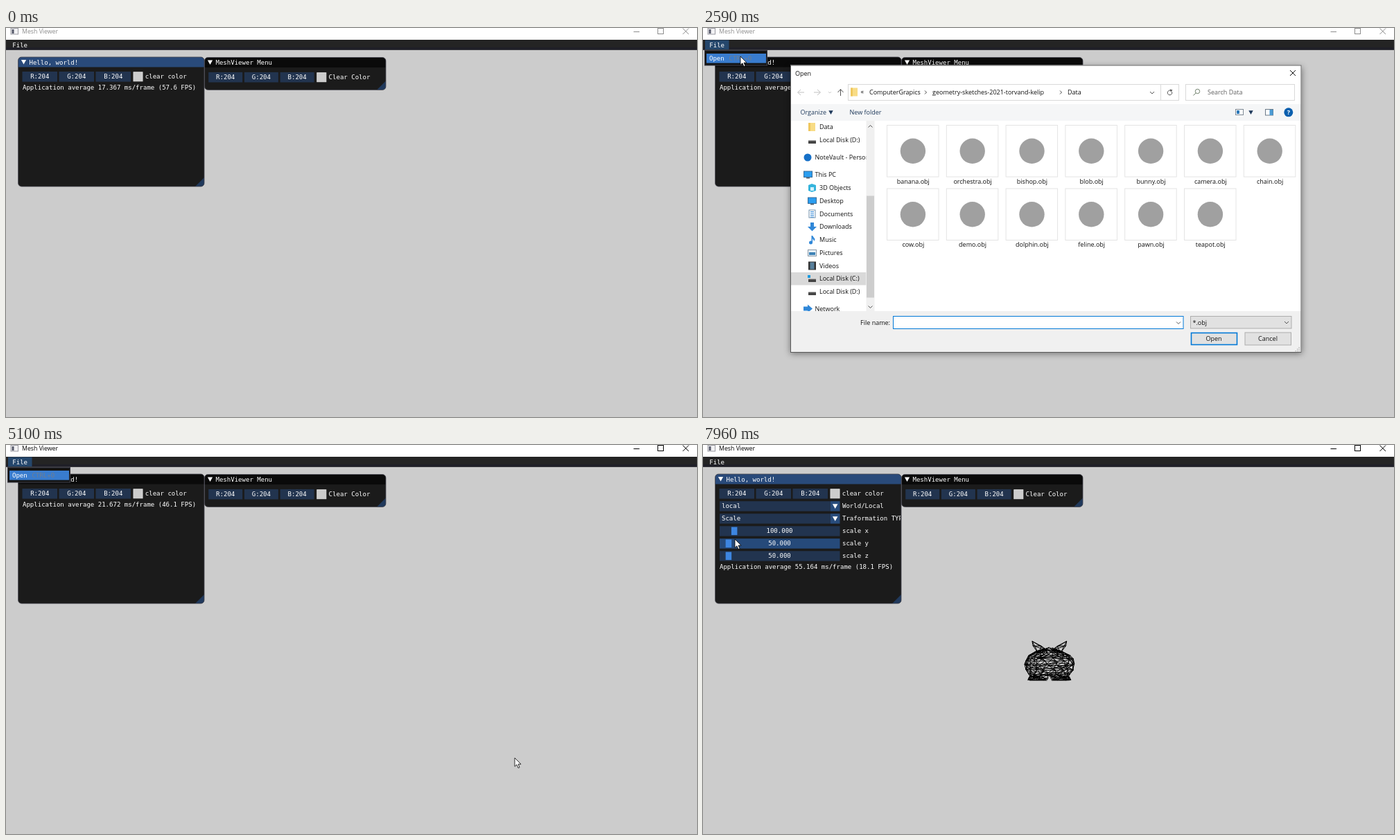
Animation, 997 px wide and 562 px high, one loop 8000 ms. Source, as an HTML page with a canvas:

```html
<!DOCTYPE html>
<html lang="en">
<head>
<meta charset="utf-8">
<title>Mesh Viewer</title>
<style>
html, body { margin: 0; width: 100%; height: 100%; overflow: hidden; background: #ccc; }
canvas { display: block; width: 997px; height: 562px; }
</style>
</head>
<body>
<canvas id="stage" width="997" height="562"></canvas>
<script>
const ctx = document.getElementById('stage').getContext('2d');
const LOOP = 8000;
const MONO = '9.04px "DejaVu Sans Mono", monospace';
const UI = '9px "Open Sans", sans-serif';
const FRAME = '#22344f', HOVER = '#264a7a', BLUE = '#3d85e0', ITEM = '#397cce';

// Moments of the session, in ms
const AT = { focus: 900, menu: 1330, blur: 2180, dialog: 2540, pick: 3880, closed: 4940,
  loaded: 5300, combo: 6250, chosen: 6830, drag: 7200, drop: 7650 };
// Cursor tip: time, x, y
const PATH = [[40, 903, 499], [840, 72, 1], [950, 72, 2], [1270, 20, 21], [1400, 20, 22],
  [1700, 26, 37], [1900, 26, 37], [2150, 54, 41], [3200, 54, 41], [3480, 439, 138],
  [3820, 646, 190], [4050, 648, 192], [4450, 655, 287], [4780, 734, 452], [5290, 734, 452],
  [6060, 122, 102], [6300, 120, 103], [6600, 63, 136], [6850, 63, 136], [7150, 36.7, 123],
  [7200, 36.7, 123], [7650, 45, 123], [7730, 45, 123], [7930, 46, 136]];
const PRESSES = [[1300, 1390], [2060, 2160], [3840, 3930], [4800, 4890], [6210, 6310], [6620, 6800], [7180, 7680]];
const FRAME_MS = [[0, 17.367], [1800, 21.537], [2180, 21.6], [5100, 21.672], [5290, 22.4], [6680, 53.065], [7960, 55.164]];

const FILES = ['banana', 'orchestra', 'bishop', 'blob', 'bunny', 'camera', 'chain',
  'cow', 'demo', 'dolphin', 'feline', 'pawn', 'teapot'];
const PLACES = [['Data', 143, 'folder'], ['Local Disk (D:)', 162, 'disk'], ['NoteVault - Person', 187, 'dot'],
  ['This PC', 212, 'screen'], ['3D Objects', 231, 'cube'], ['Desktop', 250, 'screen'], ['Documents', 268.5, 'sheet'],
  ['Downloads', 287, 'down'], ['Music', 306, 'note'], ['Pictures', 325, 'picture'], ['Videos', 343.5, 'film'],
  ['Local Disk (C:)', 362, 'system'], ['Local Disk (D:)', 381, 'disk'], ['Network', 405.5, 'right']];

const clamp = v => Math.min(1, Math.max(0, v));
const ramp = (t, a, b) => { const u = clamp((t - a) / (b - a)); return u * u * (3 - 2 * u); };

function box(x, y, w, h, fill, stroke, width = 1) {
  if (fill) { ctx.fillStyle = fill; ctx.fillRect(x, y, w, h); }
  if (stroke) { ctx.strokeStyle = stroke; ctx.lineWidth = width; ctx.strokeRect(x, y, w, h); }
}
function text(s, x, y, color = '#fff', font = MONO, align = 'left') {
  ctx.font = font; ctx.fillStyle = color; ctx.textAlign = align;
  ctx.fillText(s, x, y + 3.1);
}
const ui = (s, x, y, color = '#111', align) => text(s, x, y, color, UI, align);
function trace(points) {
  ctx.beginPath();
  points.forEach(([x, y]) => ctx.lineTo(x, y));
}
function line(color, ...points) {
  trace(points); ctx.strokeStyle = color; ctx.lineWidth = 1; ctx.stroke();
}
function poly(color, ...points) {
  trace(points); ctx.fillStyle = color; ctx.fill();
}
function disc(x, y, r, color) {
  ctx.beginPath(); ctx.arc(x, y, r, 0, 7); ctx.fillStyle = color; ctx.fill();
}
const triangle = (x, y, r, color = '#fff') => poly(color, [x - r, y - r * .8], [x + r, y - r * .8], [x, y + r]);
const chevron = (x, y, d = 1) => line('#555', [x - 3, y - 1.5 * d], [x, y + 1.5 * d], [x + 3, y - 1.5 * d]);

// ---- main window ----
function titleBar(active) {
  const c = active ? '#000' : '#8c8c8c';
  box(0, 0, 997, 17, '#fff');
  box(7, .5, 10.5, 8.5, '#f2f2f4', '#9a9aa2');
  box(8.5, 2, 3, 6, '#55596a');
  text('Mesh Viewer', 23, 5, c, '8.75px "Open Sans", sans-serif');
  line(c, [905.5, 5.5], [914, 5.5]);
  box(940.5, .5, 8, 8, null, c);
  line(c, [976.5, .5], [985, 9]);
  line(c, [985, .5], [976.5, 9]);
}
function panel(x, y, w, h, title, focused) {
  ctx.save();
  ctx.beginPath(); ctx.roundRect(x, y, w, h, 5); ctx.clip();
  box(x, y, w, h, '#1b1b1b');
  box(x, y, w, 14.5, focused ? '#294a7a' : '#0a0a0a');
  poly('#20395c', [x + w, y + h - 13], [x + w, y + h], [x + w - 13, y + h]);
  ctx.restore();
  ctx.beginPath(); ctx.roundRect(x, y, w, h, 5);
  ctx.strokeStyle = '#45454f'; ctx.lineWidth = .8; ctx.stroke();
  triangle(x + 8, y + 7, 3.6);
  text(title, x + 16, y + 7.6);
}
function colorRow(x, y, step, w, label) {
  ['R', 'G', 'B'].forEach((c, i) => {
    box(x + i * step, y - 7.3, w, 14.6, FRAME);
    text(c + ':204', x + i * step + w / 2, y, '#fff', MONO, 'center');
  });
  const sx = x + step * 3 + 1.5;
  box(sx, y - 6.5, 13, 13, '#ccc', '#dedede');
  text(label, sx + 16.8, y);
}
function combo(y, value, label, open) {
  box(24, y - 7, 160, 14.4, FRAME);
  box(184, y - 7, 13.5, 14.4, open ? '#4296fa' : '#284c7c');
  triangle(190.7, y, 3.8);
  text(value, 27, y);
  text(label, 201, y);
}
function slider(y, value, label, hot) {
  box(24, y - 7, 173.5, 14.4, hot ? HOVER : FRAME);
  box(24.4 + value * .165, y - 5.7, 8.5, 11.6, BLUE);
  text(value.toFixed(3), 110.5, y, '#fff', MONO, 'center');
  text(label, 201, y);
}
function meanFrame(t) {
  t -= t % 40;
  let i = 1;
  while (i < FRAME_MS.length - 1 && FRAME_MS[i][0] < t) i++;
  const [a, p] = FRAME_MS[i - 1], [b, q] = FRAME_MS[i];
  return p + (q - p) * clamp((t - a) / (b - a));
}
function helloPanel(t, [, cy], menuOpen) {
  panel(17.5, 42, 268.5, 187, 'Hello, world!', !menuOpen);
  ctx.save();
  ctx.beginPath(); ctx.rect(18, 57, 267, 170); ctx.clip();
  colorRow(23.5, 70.3, 53, 50.5, 'clear color');
  const loaded = t >= AT.loaded, scaling = t >= AT.chosen;
  if (loaded) {
    const open = t >= AT.combo && !scaling;
    combo(88.2, 'local', 'World/Local');
    combo(106.2, scaling ? 'Scale' : 'Translation', 'Traformation TYPE', open);
    ['x', 'y', 'z'].forEach((axis, i) => {
      const y = 124.2 + i * 18;
      const value = scaling ? (i ? 50 : scaleX(t)) : 0;
      slider(y, value, (scaling ? 'scale ' : 'translate ') + axis, t > 6950 && Math.abs(cy - y) < 7.3);
    });
    if (open) {
      box(24, 114.5, 173.5, 47.5, '#131416', '#3c3c46', .8);
      ['Translation', 'Scale', 'Rotation'].forEach((name, i) => {
        const y = 125 + i * 13.4, hot = cy > y - 7 && cy < y + 6.5;
        if (hot || !i) box(25, y - 6.8, 171.5, 13.4, hot ? ITEM : '#20384f');
        text(name, 26.5, y);
      });
    }
  }
  const ms = meanFrame(t);
  text(`Application average ${ms.toFixed(3)} ms/frame (${(1000 / ms).toFixed(1)} FPS)`, 24, loaded ? 176 : 86);
  ctx.restore();
}
function fileMenu(hot) {
  box(2.5, 32.5, 90, 21.5, '#141414', '#3e3e48');
  if (hot) box(5, 37, 86, 13.6, ITEM);
  text('Open', 9, 44);
  text('CTRL+O', 37.5, 44, 'rgba(128,128,128,.8)');
}

// ---- rabbit mesh: x in half widths, y in stage pixels ----
let seed = 7;
const rand = () => (seed = seed * 16807 % 2147483647) / 2147483647 - .5;
const edges = [];
const rings = [[295, .2], [299, .55], [304.5, .84], [310, .96], [317, 1], [324, .96], [330, .83], [334.5, .78], [339, .85]]
  .map(([y, w], j) => Array.from({ length: 16 }, (_, k) => {
    const a = (k + j % 2 / 2) * Math.PI / 8 + rand() * .25;
    return [w * Math.sin(a), Math.min(340, y + Math.cos(a) * 1.6 + rand() * 2)];
  }));
rings.forEach((ring, j) => ring.forEach((p, k) => {
  const n = (k + 1) % 16, below = rings[j + 1];
  edges.push([p, ring[n]]);
  if (below) edges.push([p, below[k]], [p, below[n]]);
}));
for (const s of [-1, 1]) {
  const ear = [[.69, 283.5], [.66, 290], [.44, 301], [.1, 296.5], [.32, 290.5]];
  const foot = [[.86, 339.5], [.8, 335], [.35, 333], [.14, 339.5], [.5, 336]];
  for (const part of [ear, foot]) part.forEach((p, i) => part.slice(i + 1).forEach(q =>
    edges.push([[p[0] * s, p[1]], [q[0] * s, q[1]]])));
}
const scaleX = t => 50 + 50 * ramp(t, AT.drag, AT.drop);
function rabbit(t) {
  const w = scaleX(t) * .36, X = p => 499.8 + p[0] * w;
  ctx.beginPath();
  for (const [p, q] of edges) { ctx.moveTo(X(p), p[1]); ctx.lineTo(X(q), q[1]); }
  ctx.strokeStyle = '#000'; ctx.lineWidth = 1; ctx.stroke();
  poly('#ccc', [499.8, 334], [499.8 + w * .1, 341], [499.8 - w * .1, 341]);
}

// ---- file dialog ----
function icon(kind, x, y) {
  const blue = '#2f87d8';
  switch (kind) {
    case 'folder': box(x + 1, y - 6, 10, 12, '#f8dc86'); box(x + 1, y - 6, 3, 12, '#efc75e'); break;
    case 'system': box(x, y - 5, 4, 4, '#1c9be0'); // falls through
    case 'disk': box(x + 1, y + 1, 11, 4, '#444'); box(x + 1, y, 11, 1.2, '#aaa'); break;
    case 'dot': disc(x + 6, y, 5.5, '#1670c8'); break;
    case 'screen': box(x + .5, y - 5, 12, 8.5, '#2a9df0', '#3a6c98'); box(x + 4, y + 4, 5, 1.5, '#567'); break;
    case 'cube': poly('#35b4dc', [x + 1, y - 4], [x + 6, y - 6], [x + 12, y - 4], [x + 12, y + 4], [x + 6, y + 6], [x + 1, y + 4]);
      box(x + 4, y - 1, 5, 5, '#d5f2fb'); break;
    case 'sheet': box(x + 2, y - 5.5, 9, 11, '#fff', '#7392ad');
      for (let i = -3; i < 5; i += 2.5) line(blue, [x + 4, y + i], [x + 9, y + i]); break;
    case 'down': box(x + 4, y - 6, 5, 6, blue); poly(blue, [x, y], [x + 13, y], [x + 6.5, y + 6.5]); break;
    case 'note': disc(x + 4.5, y + 4, 2.5, blue); box(x + 5.5, y - 6, 1.6, 10, blue);
      poly(blue, [x + 7, y - 6], [x + 10.5, y - 1], [x + 9.5, y + 2], [x + 7, y - 2]); break;
    case 'picture': box(x + .5, y - 4.5, 12, 9, '#e8f3fb', '#8a98a5'); box(x + 2, y - 1, 9, 4, '#3d82b5'); break;
    case 'film': box(x + 1, y - 6, 11, 12, '#333'); box(x + 3.5, y - 5, 6, 10, '#58809c'); break;
    case 'right': box(x, y - 3, 7, 6, blue); poly(blue, [x + 6, y - 6], [x + 13, y], [x + 6, y + 6]); break;
  }
}
function arrow(x, y, dx, dy, color) {
  line(color, [x - dx * 5, y - dy * 5], [x + dx * 4, y + dy * 4]);
  line(color, [x + dy * 4, y + dx * 4], [x + dx * 4.5, y + dy * 4.5], [x - dy * 4, y - dx * 4]);
}
function addressBar() {
  arrow(141, 93, -1, 0, '#c0c0c0');
  arrow(165, 93, 1, 0, '#c0c0c0');
  line('#ccc', [181, 92], [183, 94], [185, 92]);
  arrow(198.5, 93, 0, -1, '#555');
  box(209.5, 81.5, 477, 23, '#fff', '#d9d9d9');
  line('#d9d9d9', [660.5, 82], [660.5, 104]);
  icon('folder', 212, 92.5);
  ui('«', 227.5, 92);
  ui('ComputerGrapics', 240, 93);
  ui('geometry-sketches-2021-torvand-kelip', 331, 93);
  ui('Data', 526, 93);
  for (const x of [321, 516]) line('#444', [x - 1, 90.5], [x + 1.5, 93], [x - 1, 95.5]);
  chevron(648, 93.5);
  ctx.beginPath(); ctx.arc(673.5, 93.5, 3.3, -.4, 5);
  ctx.strokeStyle = '#555'; ctx.stroke();
  poly('#555', [673.5, 88.5], [677.5, 89.5], [675, 92.5]);
  box(696.5, 81.5, 157, 23, '#fff', '#d9d9d9');
  ctx.beginPath(); ctx.arc(713.5, 91.5, 3.2, 0, 7);
  ctx.strokeStyle = '#6e7f6a'; ctx.stroke();
  line('#6e7f6a', [711, 94], [707.5, 97.5]);
  ui('Search Data', 728, 93, '#606060');
}
function toolBar() {
  box(127, 110, 736, 24, '#f5f6f7');
  ui('Organize', 140.5, 122, '#1e395b');
  triangle(184.5, 121.7, 3.2, '#1e395b');
  ui('New folder', 211.5, 122, '#1e395b');
  box(768.5, 117.5, 11, 8, '#fff', '#7d8894');
  box(770, 119, 4, 5, '#2d79b8');
  triangle(790.5, 121.7, 3.2, '#1e395b');
  box(811.5, 117.5, 11, 8.5, '#fff', '#6b7a88');
  box(817.5, 118, 5, 8, '#4a9ad4');
  disc(844.8, 121.8, 6.5, '#0a5fae');
  text('?', 844.8, 121.8, '#fff', 'bold 9px "Open Sans", sans-serif', 'center');
}
function sideBar() {
  ctx.save();
  ctx.beginPath(); ctx.rect(127, 134, 108.5, 275); ctx.clip();
  box(127, 353, 109, 18.5, '#d9d9d9');
  for (const [name, y, kind] of PLACES) {
    const root = /Vault|PC|Network/.test(name);
    icon(kind, root ? 145 : 151, y);
    ui(name, root ? 161.5 : 168, y);
  }
  ctx.restore();
  box(235.5, 134, 12, 275, '#f0f0f0');
  box(236, 242.5, 11, 147, '#cdcdcd');
  chevron(241.5, 142, -1);
  chevron(241.5, 403);
}
function fileGrid(picked, [cx, cy]) {
  FILES.forEach((name, i) => {
    const x = 265.5 + i % 7 * 85.8, y = i < 7 ? 140.5 : 232;
    const hot = cx > x - 3 && cx < x + 78 && cy > y - 1 && cy < y + 89;
    const chosen = picked && name === 'bunny';
    if (chosen) box(x - 2.7, y - 1, 81, 89.5, '#cce8ff', '#99d1ff');
    else if (hot) box(x - 3.2, y - 1.5, 82, 90, '#e5f3ff');
    box(x, y, 74.5, 74.5, chosen || hot ? null : '#fff', chosen ? '#b8dcf6' : hot ? '#d3e6f5' : '#e4e4e4');
    disc(x + 37.4, y + 37.3, 18.2, '#a0a0a0');
    ui(name + '.obj', x + 37.8, y + 81, '#111', 'center');
  });
}
function dialog(t, cursor) {
  const picked = t >= AT.pick;
  ctx.save();
  ctx.shadowColor = 'rgba(0,0,0,.45)'; ctx.shadowBlur = 9; ctx.shadowOffsetY = 2;
  box(126, 53.5, 737.5, 415.5, '#fff');
  ctx.restore();
  ui('Open', 133, 65.5);
  line('#111', [847, 61], [855, 69]);
  line('#111', [855, 61], [847, 69]);
  addressBar();
  toolBar();
  sideBar();
  fileGrid(picked, cursor);
  box(127, 409, 736, 59.5, '#f0f0f0');
  ui('File name:', 270, 425.5, '#111', 'right');
  box(274.5, 416.5, 418.5, 18, '#fff', t < 4050 ? '#0078d7' : '#7a7a7a');
  if (picked) ui('bunny.obj', 277, 426);
  chevron(686, 426);
  box(703.5, 416.5, 145.5, 17.5, '#e1e1e1', '#adadad');
  ui('*.obj', 706.5, 425.5);
  chevron(842, 425.5);
  const over = cursor[0] > 704 && cursor[1] > 440;
  box(704.5, 440.5, 66, 17, over ? '#e5f1fb' : '#e1e1e1', '#0078d7', 1.6);
  ui('Open', 737, 449, '#111', 'center');
  box(782, 440, 66.5, 18, '#e1e1e1', '#adadad');
  ui('Cancel', 815, 449, '#111', 'center');
  for (let i = 0; i < 3; i++) for (let j = 0; j <= i; j++) box(859.5 - j * 2.5, 461 + i * 2.5, 1.3, 1.3, '#aaa');
  box(126.5, 54, 736.5, 414.5, null, '#5a5a5a');
}

// ---- cursor ----
function cursorAt(t) {
  let i = 1;
  while (i < PATH.length - 1 && PATH[i][0] < t) i++;
  const [a, x, y] = PATH[i - 1], [b, u, v] = PATH[i], k = ramp(t, a, b);
  return [x + (u - x) * k, y + (v - y) * k];
}
function drawCursor(t, [x, y]) {
  if (PRESSES.some(([a, b]) => t >= a && t < b)) disc(x + .3, y + .8, 9.5, 'rgba(205,205,60,.75)');
  const shape = [[0, 0], [0, 12.4], [2.9, 9.8], [5, 14.6], [7, 13.7], [5, 9.1], [9, 9.1]].map(([u, v]) => [x + u, y + v]);
  trace(shape); ctx.closePath();
  ctx.fillStyle = '#fff'; ctx.fill();
  ctx.strokeStyle = '#000'; ctx.lineWidth = .8; ctx.stroke();
}

function draw(t) {
  const cursor = cursorAt(t);
  const dialogOpen = t >= AT.dialog && t < AT.closed;
  const menuOpen = t >= AT.menu && t < AT.loaded;
  box(0, 0, 997, 562, '#ccc');
  titleBar(t >= AT.focus && t < AT.blur || t >= AT.closed);
  box(0, 17, 997, 14.6, '#242424');
  box(0, 28, 997, 3.6, '#1f1f27');
  if (menuOpen) box(3, 17.5, 34.5, 13.6, '#25476c');
  text('File', 9.3, 25);
  if (t >= AT.loaded) rabbit(t);
  helloPanel(t, cursor, menuOpen);
  panel(286.5, 42.5, 261.5, 47, 'MeshViewer Menu', false);
  colorRow(292.2, 71.2, 51.7, 49, 'Clear Color');
  if (menuOpen) fileMenu(t >= 1620);
  if (dialogOpen) dialog(t, cursor);
  if (t >= 40) drawCursor(t, cursor);
}
function tick(now) {
  draw(now % LOOP);
  requestAnimationFrame(tick);
}
draw(0);
requestAnimationFrame(tick);
</script>
</body>
</html>
```
